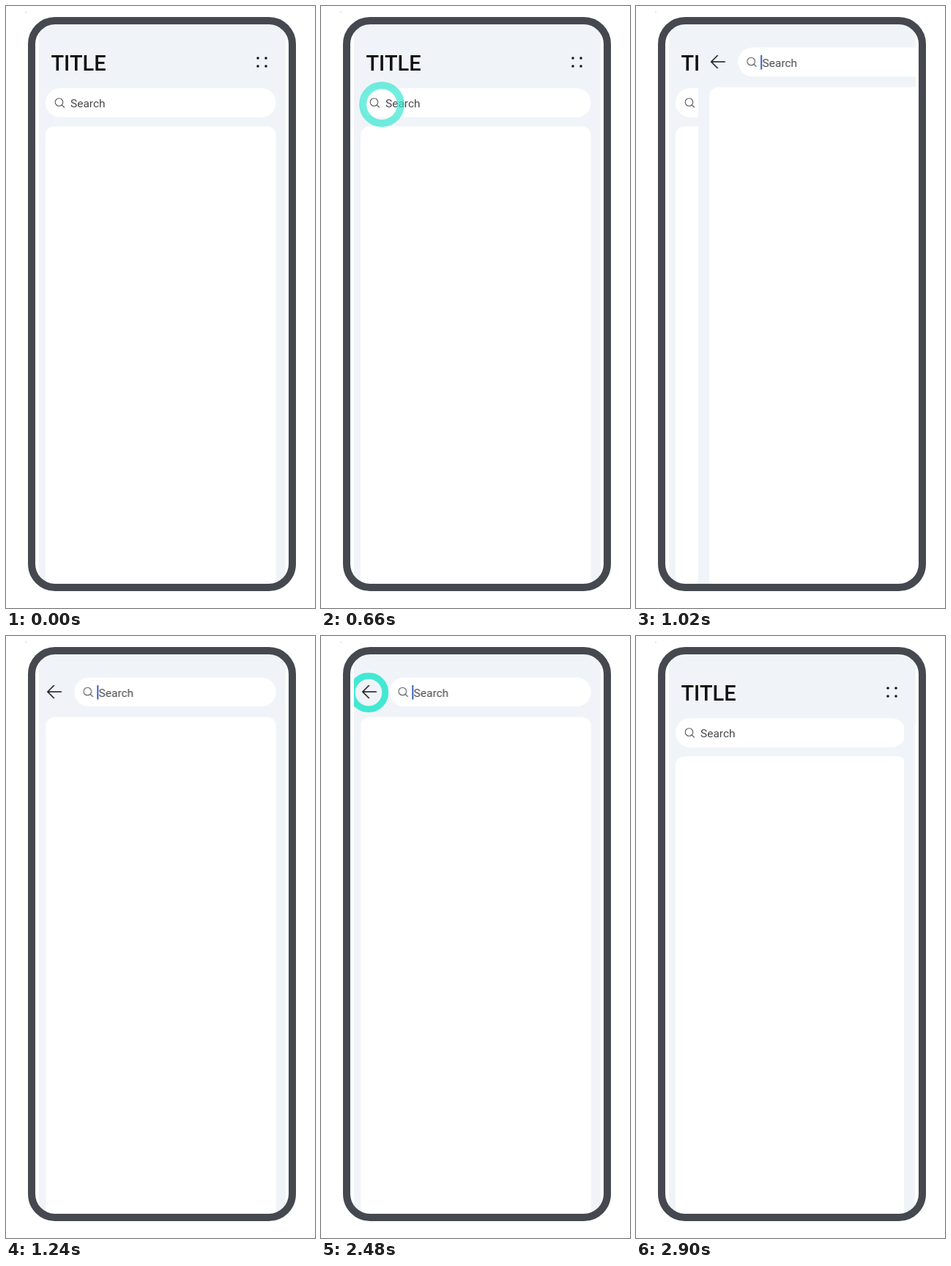
An HTML page that plays this animation: 422 px wide and 820 px high, repeating every 3.24 s.

```html
<!DOCTYPE html>
<html lang="en">
<head>
<meta charset="utf-8">
<title>Search transition</title>
<style>
  html, body { margin: 0; width: 100%; height: 100%; overflow: hidden; background: #fff; }
  svg { display: block; width: 422px; height: 820px; }
  text { font-family: Roboto, "Open Sans", sans-serif; }
  .title { font-size: 29px; font-weight: 500; fill: #111; }
  .label { font-size: 15.5px; fill: #484a4c; }
  .bg { fill: #f0f4f8; }
  .card { fill: #fff; }
  .icon { fill: none; stroke: #55585a; stroke-width: 1.1; stroke-linecap: round; }
  .arrow { fill: none; stroke: #151515; stroke-width: 1.6; stroke-linecap: round; stroke-linejoin: round; }
  .ring { fill: none; stroke: #33e6cf; stroke-width: 8.5; opacity: 0; transform-box: fill-box; transform-origin: center; }
  #page { transform: translateX(343px); }
</style>
</head>
<body>
<svg viewBox="0 0 422 820">
  <defs>
    <clipPath id="screen"><rect x="45" y="22" width="337" height="766"/></clipPath>
    <g id="lens" class="icon">
      <circle r="5.3"/>
      <path d="M3.9 3.9L7 7"/>
    </g>
  </defs>

  <rect x="26" y="8" width="2" height="1" fill="#d4d4d4"/>

  <g clip-path="url(#screen)">
    <rect class="bg" x="45" y="22" width="337" height="766"/>
    <text class="title" x="61.5" y="88">TITLE</text>
    <g fill="#151515">
      <circle cx="344" cy="71" r="1.8"/>
      <circle cx="355" cy="71" r="1.8"/>
      <circle cx="344" cy="82" r="1.8"/>
      <circle cx="355" cy="82" r="1.8"/>
    </g>
    <rect class="card" x="54" y="112" width="314.5" height="39.5" rx="19.75"/>
    <use href="#lens" x="72.5" y="131"/>
    <text class="label" x="88" y="138">Search</text>
    <rect class="card" x="54" y="164" width="314.5" height="660" rx="12"/>

    <g id="page">
      <rect class="bg" x="39" y="22" width="360" height="766"/>
      <path class="arrow" d="M75 76H57M65 67.5L56.5 76L65 84.5"/>
      <rect class="card" x="93" y="56.5" width="275.5" height="39.5" rx="19.75"/>
      <use href="#lens" x="111" y="75.5"/>
      <rect x="124" y="67" width="1.8" height="19.5" fill="#2450b8"/>
      <text class="label" x="126.3" y="83">Search</text>
      <rect class="card" x="54" y="110.5" width="314.5" height="714" rx="12"/>
    </g>

    <circle id="tapOpen" class="ring" cx="83" cy="134" r="21.75"/>
    <circle id="tapBack" class="ring" cx="65" cy="77" r="21.75"/>
  </g>

  <rect x="35" y="20" width="356" height="772" rx="32" fill="none" stroke="#45484f" stroke-width="10"/>
</svg>

<script>
  const LOOP = 3240;

  // Each step: [time in ms, properties, easing to the next step]
  function play(id, steps) {
    const frames = steps.map(([time, props, easing = "linear"]) =>
      ({ offset: time / LOOP, easing, ...props }));
    document.getElementById(id).animate(frames, { duration: LOOP, iterations: Infinity });
  }

  const slide = x => ({ transform: `translateX(${x}px)` });
  const ring = (size, opacity) => ({ transform: `scale(${size})`, opacity });

  play("page", [
    [0, slide(343)],
    [673, slide(343), "cubic-bezier(.4, 0, .2, 1)"],
    [1266, slide(0)],
    [2468, slide(0), "cubic-bezier(.473, 0, .329, .794)"],
    [2900, slide(327)],
    [LOOP, slide(327)]
  ]);

  // Press: shrink and appear, hold, then grow and fade
  function tap(id, start) {
    play(id, [
      [0, ring(1.48, 0)],
      [start - 1, ring(1.48, 0)],
      [start - 1, ring(1.48, .2)],
      [start + 200, ring(1, 1)],
      [start + 300, ring(1, 1)],
      [start + 440, ring(1.54, 0)],
      [LOOP, ring(1.54, 0)]
    ]);
  }

  tap("tapOpen", 540);
  tap("tapBack", 2300);
</script>
</body>
</html>
```
